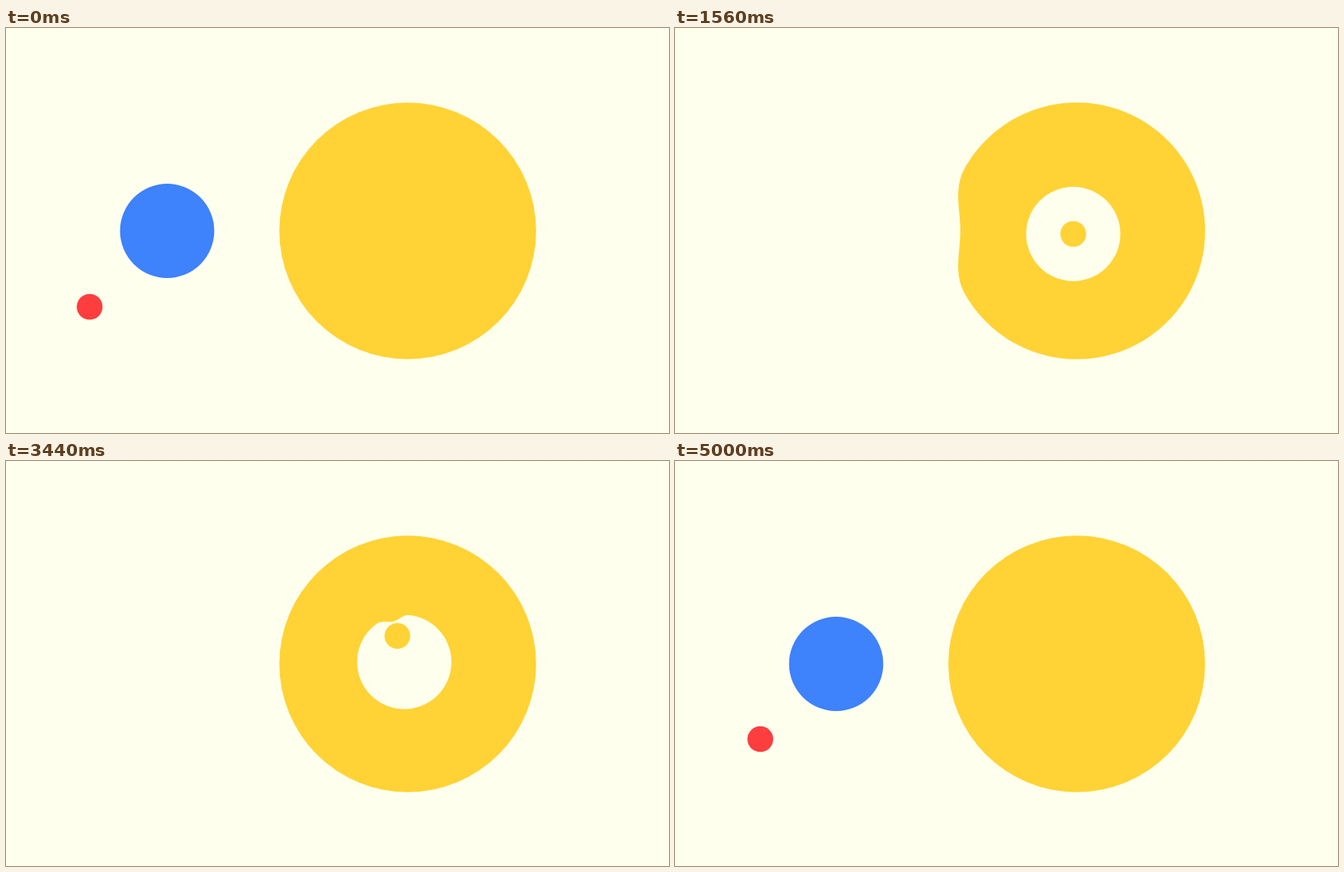
Write an HTML page with a canvas that moves like this. It is 864 px wide and 528 px high and loops after 5040 ms.

```html
<!DOCTYPE html>
<html lang="en">
<head>
<meta charset="utf-8">
<title>Nested circles</title>
<style>
  html, body { margin: 0; width: 100%; height: 100%; overflow: hidden; background: #ffffee; }
  canvas { display: block; width: 864px; height: 528px; }
</style>
</head>
<body>
<canvas id="stage" width="864" height="528"></canvas>
<script>
const ctx = document.getElementById('stage').getContext('2d');
const LOOP = 5040, STEP = 40;
const CREAM = '#ffffee', YELLOW = '#ffd335', BLUE = '#3e82fc', RED = '#fe3d3e';
const SUN_R = 167.3, BLOB_R = 61.4, DOT_R = 16.8;
const MID_Y = 264.5;

// Eased progress from 0 to 1; a shapes the start, b the end.
function ease(t, from, to, a = 2, b = 2) {
  const u = Math.min(1, Math.max(0, (t - from) / (to - from)));
  return 1 - (1 - u ** a) ** b;
}

// One soft bump between two times.
function pulse(t, from, to) {
  return t > from && t < to ? Math.sin(Math.PI * (t - from) / (to - from)) ** 2 : 0;
}

// Dent left in a rim of radius r after something slips through it: a damped spring.
function snap(t, start, r) {
  const u = Math.max(0, t - start);
  return 0.425 * r * Math.exp(-u / 250) * Math.sin(2 * Math.PI * u / 900);
}

const blobX = t => 210 + 309 * (ease(t, 600, 1600, 3, 4.9) - ease(t, 3750, 5000, 1.3, 3.64));
const sunX = t => 523.5 + 1.5 * (pulse(t, 700, 1460) - pulse(t, 3980, 4740));

// The copy inside the sun trails the blob a little and floats up and down.
const lagX = t => blobX(t - 5) - blobX(t);
const floatY = t => 4 * ease(t, 700, 1000) - 6.5 * ease(t, 2200, 3400) + 2.5 * ease(t, 3440, 3800);

// Dot relative to the blob: it moves in, spirals out and back, then leaves.
function dotOffset(t) {
  const r = 144 * (ease(t, 1580, 2500, 1, 3) - ease(t, 3200, 3640, 2, 4));
  const angle = Math.PI * (1 + 0.403 * (t - 2360) / 180);
  const awayX = 1 - ease(t, 0, 1000, 4, 3) + ease(t, 4440, LOOP, 1.6, 1.7);
  const awayY = 1 - ease(t, 0, 1000, 2, 2.5) + ease(t, 4440, LOOP, 2.5, 2.5);
  return { x: r * Math.cos(angle) - 101 * awayX, y: r * Math.sin(angle) + 99 * awayY };
}

// Circle whose rim is pushed inwards by dent around one angle.
function disc(x, y, r, dent = 0, angle = Math.PI, spread = 0.51) {
  const path = new Path2D();
  if (Math.abs(dent) < 0.05) {
    path.arc(x, y, r, 0, 2 * Math.PI);
    return path;
  }
  const steps = 360;
  for (let i = 0; i < steps; i++) {
    const d = -Math.PI + 2 * Math.PI * i / steps;
    const push = Math.abs(d) < spread ? dent * Math.cos(Math.PI * d / (2 * spread)) ** 2 : 0;
    path.lineTo(x + (r - push) * Math.cos(angle + d), y + (r - push) * Math.sin(angle + d));
  }
  path.closePath();
  return path;
}

function fill(path, color) {
  ctx.fillStyle = color;
  ctx.fill(path);
}

function inside(path, draw) {
  ctx.save();
  ctx.clip(path);
  draw();
  ctx.restore();
}

function render(t) {
  const x = blobX(t), holeX = x + lagX(t), holeY = MID_Y + floatY(t);
  const offset = dotOffset(t);
  const sun = disc(sunX(t), MID_Y, SUN_R, snap(t, 1240, SUN_R));
  const blob = disc(x, MID_Y, BLOB_R, snap(t, 760, BLOB_R));
  const hole = disc(holeX, holeY, BLOB_R, snap(t, 3395, BLOB_R), -1.83, 0.37);
  const dot = disc(x + offset.x, MID_Y + offset.y, DOT_R);
  const innerDot = disc(holeX + offset.x, holeY + offset.y, DOT_R);

  ctx.fillStyle = CREAM;
  ctx.fillRect(0, 0, 864, 528);
  fill(dot, RED);
  fill(blob, BLUE);
  inside(blob, () => fill(dot, CREAM));
  fill(sun, YELLOW);
  inside(sun, () => {
    fill(innerDot, CREAM);
    fill(hole, CREAM);
    inside(hole, () => fill(innerDot, YELLOW));
  });
}

const start = performance.now();
function frame() {
  const t = (performance.now() - start) % LOOP;
  render(Math.floor(t / STEP) * STEP);
  requestAnimationFrame(frame);
}
frame();
</script>
</body>
</html>
```
